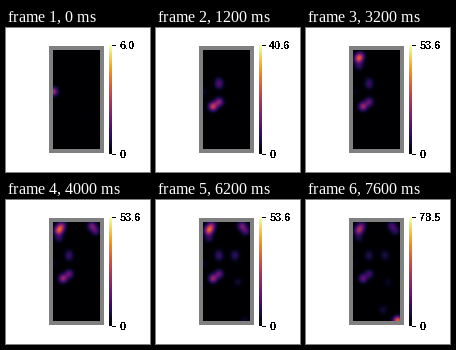
A matplotlib script that plays this animation: 144 by 144 pixels, repeating every 8000 ms.

```python
import numpy as np
import matplotlib.pyplot as plt
from matplotlib.animation import FuncAnimation
from matplotlib.patches import Rectangle

SIZE, STEP, FRAMES = 144, 200, 40
LEFT, TOP, RIGHT, BOTTOM = 47, 22, 94, 121
SPREAD, FADE = 3.0, 0.7

# Each stroke moves from one point to another, one touch per step:
# start ms, touches, from, to, strength
STROKES = [
    (0, 1, (47.5, 63.5), (47.5, 63.5), 2.5),
    (400, 2, (57, 78.5), (63, 74), 21),
    (1000, 2, (63, 57), (63, 53), 7),
    (2800, 1, (53, 38), (53, 38), 8),
    (3000, 3, (52.5, 31), (56, 25), 23),
    (3800, 2, (86, 26), (89.5, 31), 16),
    (4400, 2, (79, 54), (79, 57.5), 6),
    (5200, 1, (82, 82), (82, 82), 4.5),
    (6200, 2, (88.5, 121), (91, 121), 4),
    (6800, 2, (92, 120.5), (92, 120.5), 27),
    (7600, 1, (77, 110), (77, 110), 7),
]
PEAKS = {0: 6.0, 400: 31.2, 600: 40.6, 3000: 53.6, 6800: 62.6, 7000: 78.5}

fig = plt.figure(figsize=(SIZE / 72, SIZE / 72), dpi=72, facecolor="white")
ax = fig.add_axes([0, 0, 1, 1])
ax.axis("off")


def box(x0, y0, x1, y1, color):
    ax.add_patch(Rectangle((x0, y0), x1 - x0, y1 - y0, fc=color, lw=0,
                           antialiased=False))


def label(y, text):
    return ax.text(113.3, y, text, family="Liberation Sans", weight="bold",
                   size=11, va="baseline", ha="left", antialiased=False)


def picture(data, x0, y0, x1, y1):
    return ax.imshow(data, cmap="inferno", vmin=0, vmax=1, zorder=2,
                     extent=(x0, x1, y1, y0), interpolation="nearest")


xs, ys = np.meshgrid(np.arange(LEFT, RIGHT) + 0.5,
                     np.arange(TOP, BOTTOM) + 0.5)
box(43, 18, 98, 125, "#808080")
heat = picture(np.zeros(xs.shape), LEFT, TOP, RIGHT, BOTTOM)
picture(np.linspace(1, 0, 109)[:, None], 103, 17, 106, 126)
for y in (17, 126):
    box(106, y, 110, y + 1, "black")
top_label = label(21, "")
label(130, "0")
ax.set(xlim=(0, SIZE), ylim=(SIZE, 0), aspect="auto")


def touches():
    """Yield the start time and heat of every touch; later ones are weaker."""
    for start, count, a, b, strength in STROKES:
        for k, (x, y) in enumerate(np.linspace(a, b, count)):
            dist2 = (xs - x) ** 2 + (ys - y) ** 2
            yield (start + k * STEP,
                   strength * FADE ** k * np.exp(-dist2 / (2 * SPREAD ** 2)))


LAYERS = list(touches())


def update(i):
    now = i * STEP
    peak = max(value for start, value in PEAKS.items() if start <= now)
    heat.set_data(sum(layer for start, layer in LAYERS if start <= now) / peak)
    top_label.set_text(f"{peak:.1f}")
    return heat, top_label


anim = FuncAnimation(fig, update, frames=FRAMES, interval=STEP,
                     repeat=True, repeat_delay=0)
plt.show()
```
